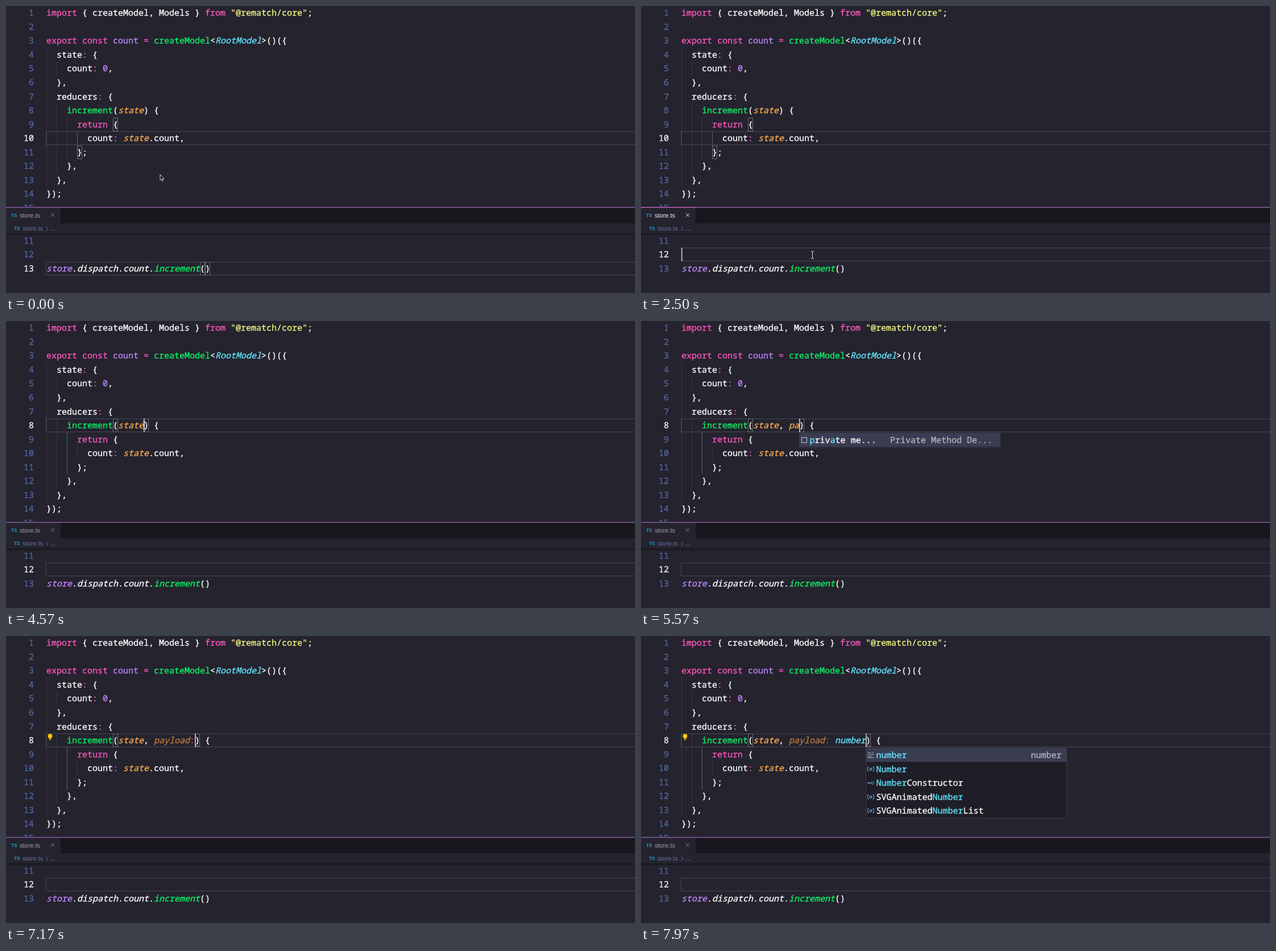
An HTML page for the animation above (8 s loop, 1106 px wide and 506 px high).

```html
<!DOCTYPE html>
<html lang="en">
<head>
<meta charset="utf-8">
<title>Typed reducer</title>
<style>
  html, body { margin: 0; width: 100%; height: 100%; overflow: hidden; background: #24232e; }
  svg { display: block; width: 1106px; height: 506px; }
  text { white-space: pre; text-rendering: geometricPrecision; }
  .code { font: 15px "Noto Sans Mono", "DejaVu Sans Mono", monospace; }
  .code, .code tspan { fill: currentColor; stroke: currentColor; stroke-width: .32; }
  .ui { font: 11px "Liberation Sans", Arial, sans-serif; }
  .ts { font: bold 8.3px "Liberation Sans", Arial, sans-serif; fill: #2b9cc4; }
  .num { color: #5268a4; text-anchor: end; }
  .num.on { color: #f4f4f6; }
  .w { color: #fff; } .p { color: #ff57bd; } .v { color: #c187ff; } .g { color: #0df565; }
  .c { color: #62e6ff; } .o { color: #ffaa50; } .y { color: #f3f982; } .d { color: #c07a3c; }
  .m { color: #b4b4bc; } .q { color: #c0458f; }
  .i { font-style: italic; }
  .row { fill: none; stroke: #484753; }
  .match { fill: none; stroke: #66736f; }
  .guide { stroke: #383742; }
  .guide.on { stroke: #62616e; }
</style>
</head>
<body>
<svg viewBox="0 0 1106 506">
  <defs>
    <clipPath id="upper"><rect width="1106" height="354"/></clipPath>
    <linearGradient id="shade" x2="0" y2="1">
      <stop stop-color="#15141b"/><stop offset="1" stop-color="#24232e"/>
    </linearGradient>
  </defs>
  <rect width="1106" height="506" fill="#24232e"/>
  <g id="top" clip-path="url(#upper)"></g>
  <rect y="355" width="1106" height="28" fill="#18171e"/>
  <rect y="355" width="96" height="28" fill="#24232e"/>
  <rect y="354.300" width="1106" height="1.400" fill="#8f60ac"/>
  <rect id="edge" y="354.300" width="96" height="1.400" fill="#b0589c"/>
  <text class="ts" x="9" y="372">TS</text>
  <text class="ui" id="tab" x="24" y="373">store.ts</text>
  <path id="close" d="M79 365.500l6 6m0-6l-6 6" fill="none"/>
  <text class="ts" x="14" y="395">TS</text>
  <text class="ui" x="29" y="396" fill="#6272a4">store.ts</text>
  <path d="M70.500 389l3.500 3.800l-3.500 3.800" fill="none" stroke="#6272a4"/>
  <text class="ui" x="78" y="396" fill="#9299b5">...</text>
  <rect y="401" width="1106" height="4" fill="url(#shade)"/>
  <g id="bottom"></g>
  <g id="popup"></g>
  <g id="arrow">
    <path d="M0 0V10.200L2.400 8.200L4 11.800L5.600 11L4.100 7.600H7Z" fill="#111" stroke="#e8e8e8" stroke-width=".9"/>
  </g>
  <path id="beam" d="M-2.500 -6.500Q0 -6.500 0 -5Q0 -6.500 2.500 -6.500M0 -5V5M-2.500 6.500Q0 6.500 0 5Q0 6.500 2.500 6.500" fill="none" stroke="#e6e6e6"/>
</svg>
<script>
const LOOP = 8000, CELL = 9, LEFT = 71, ROW = 24.55, BASE = 17.1;
const CLICK_STORE = 2400, CLICK_PARAM = 4250;
const $ = id => document.getElementById(id);

// "§" starts a run; its first letter is the colour, a capital means italic.
const source = [
  '§pimport§w { createModel, Models } §pfrom §y"@rematch/core"§w;',
  '',
  '§pexport const §vcount §p= §gcreateModel§w<§CRootModel§w>()({',
  '§w  state§p:§w {',
  '§w    count§p: §v0§w,',
  '§w  },',
  '§w  reducers§p:§w {',
  '',
  '§p      return§w {',
  '§w        count§p: §Ostate§w.count,',
  '§w      };',
  '§w    },',
  '§w  },',
  '§w});',
  ''
];
const call = '§Vstore§w.§Wdispatch§w.§Wcount§w.§Gincrement§w()';

// Time and number of typed characters
const typedText = ', payload: number';
const typing = [
  [4730, 1], [4930, 2], [5230, 3], [5430, 4], [5600, 5], [5740, 6], [5860, 7],
  [5980, 8], [6120, 9], [6370, 10], [6500, 11], [6650, 12], [6900, 11], [7030, 10],
  [7200, 11], [7310, 12], [7430, 13], [7550, 14], [7670, 15], [7790, 16], [7900, 17]
];

// Time and pointer position
const path = [
  [0, 271, 297], [1700, 251, 191], [1760, 251, 191], [2300, 300, 438],
  [2450, 300, 438], [2850, 333, 459], [3450, 333, 459], [4150, 243, 184], [LOOP, 243, 184]
];

const numberItems = [
  ['k', 'number'], ['v', 'Number'], ['i', 'NumberConstructor'],
  ['v', 'SVGAnimatedNumber'], ['v', 'SVGAnimatedNumberList']
];
const moreItems = [
  ['k', 'never'], ['k', 'null'], ['v', 'Navigator'], ['v', 'Node'],
  ['v', 'NodeFilter'], ['v', 'NodeList'], ['v', 'Notification']
];
const icons = {
  k: '<path d="M-5.500 -4h6M2.500 -4h3M-5.500 -1h3M-.5 -1h6M-5.500 2h7M-5.500 4.500h11" stroke="#b8b8c0"/>',
  v: '<path d="M-3 -3.500h-2.500v7h2.500M3 -3.500h2.500v7h-2.500M-2 1.500v-2l2-1.500l2 1v2l-2 1.500zM-2 -.5l2 1l2-1.500" stroke="#62a8e8"/>',
  i: '<path d="M-3 0h4" stroke="#62a8e8"/><circle cx="-4" r="1.500" fill="#62a8e8"/><circle cx="3" r="2.300" stroke="#62a8e8"/>',
  s: '<rect x="-4.500" y="-4.500" width="9" height="9" stroke="#d0d0d5"/>'
};

const escape = s => s.replace(/&/g, '&amp;').replace(/</g, '&lt;');
const runs = s => s.split('§').slice(1).map(r => {
  const c = r[0].toLowerCase();
  return `<tspan class="${c}${c === r[0] ? '' : ' i'}">${escape(r.slice(1))}</tspan>`;
}).join('');
const text = (x, y, s) => `<text class="code" x="${x}" y="${y}">${runs(s)}</text>`;
const rect = (x, y, w, h, attrs) =>
  `<rect x="${x}" y="${y}" width="${w}" height="${h}" ${attrs}/>`;
const lineTop = n => 0.1 + ROW * (n - 1);
const storeTop = n => 401.4 + ROW * (n - 11);
const currentRow = y => rect(LEFT - .5, Math.round(y) + .5, 1060, 23, 'class="row"');
const match = (x, y) => rect(x + .5, Math.round(y) + .5, CELL - 1, 23, 'class="match"');
const caret = (x, y) => rect(x + .3, Math.round(y), 1.2, 24, 'fill="#f5f5f5"');
const lineNumber = (n, y, on) =>
  `<text class="code num${on ? ' on' : ''}" x="49" y="${y + BASE}">${n}</text>`;
const guide = (x, from, to, on) =>
  `<path class="guide${on ? ' on' : ''}" d="M${x + .5} ${lineTop(from)}V${lineTop(to + 1)}"/>`;

function drawTop(s) {
  const current = s.inParam ? 8 : 10, end = 242 + CELL * s.count;
  const typed = typedText.slice(0, s.count);
  const name = typed.slice(2, 9), rest = typed.slice(10);
  const args = '§Ostate' + (typed ? '§w' + typed.slice(0, 2) : '') +
    (s.dim ? '§D' : '§O') + name + (s.count > 9 ? '§q:' : '') + '§C' + rest;
  const lines = source.slice();
  lines[7] = `§g    increment§w(${args}§w) {`;

  let out = guide(71, 4, 13) + guide(89, 5, 5) + guide(89, 8, 12) +
    guide(107, 9, 11, s.inParam) + guide(125, 10, 10, !s.inParam) +
    currentRow(lineTop(current));
  out += s.inParam
    ? match(188, lineTop(8)) + match(end, lineTop(8))
    : match(188, lineTop(9)) + match(125, lineTop(11));
  lines.forEach((line, i) => {
    const y = lineTop(i + 1);
    out += lineNumber(i + 1, y, i + 1 === current) + text(LEFT, y + BASE, line);
  });
  if (s.error) out += `<path d="M${end} 195l2-2l2 2l2-2l2 2" fill="none" stroke="#e0444c"/>`;
  if (s.topCaret) out += s.inParam ? caret(end, lineTop(8)) : caret(305, lineTop(10));
  if (s.dim) out += '<circle cx="77.500" cy="176.500" r="3.900" fill="#ffc800"/>' +
    '<path d="M75.700 179h3.600v4.200h-3.600z" fill="#ffc800"/><path d="M75.700 181.200h3.600" stroke="#24232e" stroke-width=".8"/>';
  return out;
}

function drawBottom(s) {
  const current = s.storeClicked ? 12 : 13;
  let out = currentRow(storeTop(current));
  if (s.hover) out += rect(260, 451, 81, 24, 'fill="#2f656b"');
  if (!s.storeClicked) out += match(341, storeTop(13)) + match(350, storeTop(13));
  for (const n of [11, 12, 13]) out += lineNumber(n, storeTop(n), n === current);
  out += text(LEFT, storeTop(13) + BASE, call);
  if (s.storeCaret) out += caret(LEFT, storeTop(12));
  return out;
}

function mark(name, prefix) {
  const capital = prefix[0].toUpperCase() + prefix.slice(1);
  let at = name.indexOf(capital);
  if (at < 0) at = name.indexOf(prefix);
  if (at >= 0) {
    const stop = at + prefix.length;
    return `§w${name.slice(0, at)}§c${name.slice(at, stop)}§w${name.slice(stop)}`;
  }
  let k = 0;
  return [...name].map(ch => ch === prefix[k] ? (k++, '§c' + ch) : '§w' + ch).join('');
}

function drawList(x, items, prefix, detail, detailX) {
  const top = 197.5, height = Math.round(items.length * ROW) + 1;
  let out = rect(x + .5, top, 353, height, 'fill="#1f1e27" stroke="#3c3b47"') +
    rect(x + 1, top + .5, 352, 24, 'fill="#3a3d52"');
  items.forEach(([icon, name], i) => {
    const y = top + .5 + i * ROW;
    out += `<g transform="translate(${x + 9} ${y + 12})" fill="none">${icons[icon]}</g>` +
      text(x + 18.5, y + BASE, mark(name, prefix));
  });
  return out + text(x + detailX, top + .5 + BASE, '§m' + detail);
}

function drawPopup(s) {
  if (s.hover) return rect(260.5, 419.5, 374, 32, 'fill="#1f1e27" stroke="#4d5b93"') +
    text(267.500, 440.800, '§w(method) §gincrement§w(): Action§p<void§w, §pvoid>');
  const x = 242 + CELL * s.count, prefix = typedText.slice(2, s.count);
  if (s.count === 3 || s.count === 4)
    return drawList(x, [['s', 'private me...']], prefix, 'Private Method De...', 160);
  if (s.count < 12) return '';
  const items = s.count < 14 ? numberItems.concat(moreItems) : numberItems;
  return drawList(x, items, typedText.slice(11, s.count), 'number', 290.500);
}

function stateAt(t) {
  const last = typing.filter(k => k[0] <= t).pop();
  const blink = start => (t - start + LOOP) % 1000 < 500;
  const inParam = t >= CLICK_PARAM, storeClicked = t >= CLICK_STORE;
  return {
    count: last ? last[1] : 0,
    inParam, storeClicked,
    active: storeClicked && !inParam,
    topCaret: inParam ? blink(last ? last[0] : CLICK_PARAM) : !storeClicked && blink(100),
    storeCaret: storeClicked && !inParam && blink(CLICK_STORE),
    hover: t >= 2950 && t < 3560,
    dim: t >= 6200,
    error: t >= 7100
  };
}

function movePointer(t) {
  const i = path.findIndex(k => k[0] > t), a = path[i - 1], b = path[i];
  const u = (t - a[0]) / (b[0] - a[0]), e = u * u * (3 - 2 * u);
  const place = `translate(${a[1] + (b[1] - a[1]) * e} ${a[2] + (b[2] - a[2]) * e})`;
  const overText = t >= 2250;
  $('arrow').setAttribute('transform', place);
  $('beam').setAttribute('transform', place);
  $('arrow').style.display = overText ? 'none' : '';
  $('beam').style.display = overText && t < 4730 ? '' : 'none';
}

let shown = '';
function render(t) {
  const s = stateAt(t), key = JSON.stringify(s);
  if (key !== shown) {
    shown = key;
    $('top').innerHTML = drawTop(s);
    $('bottom').innerHTML = drawBottom(s);
    $('popup').innerHTML = drawPopup(s);
    $('tab').style.fill = s.active ? '#f5f5f5' : '#a3a3aa';
    $('close').style.stroke = s.active ? '#f0f0f0' : '#85858d';
    $('edge').style.display = s.active ? '' : 'none';
  }
  movePointer(t);
}

const start = performance.now();
function tick() {
  render((performance.now() - start) % LOOP);
  requestAnimationFrame(tick);
}
tick();
</script>
</body>
</html>
```
